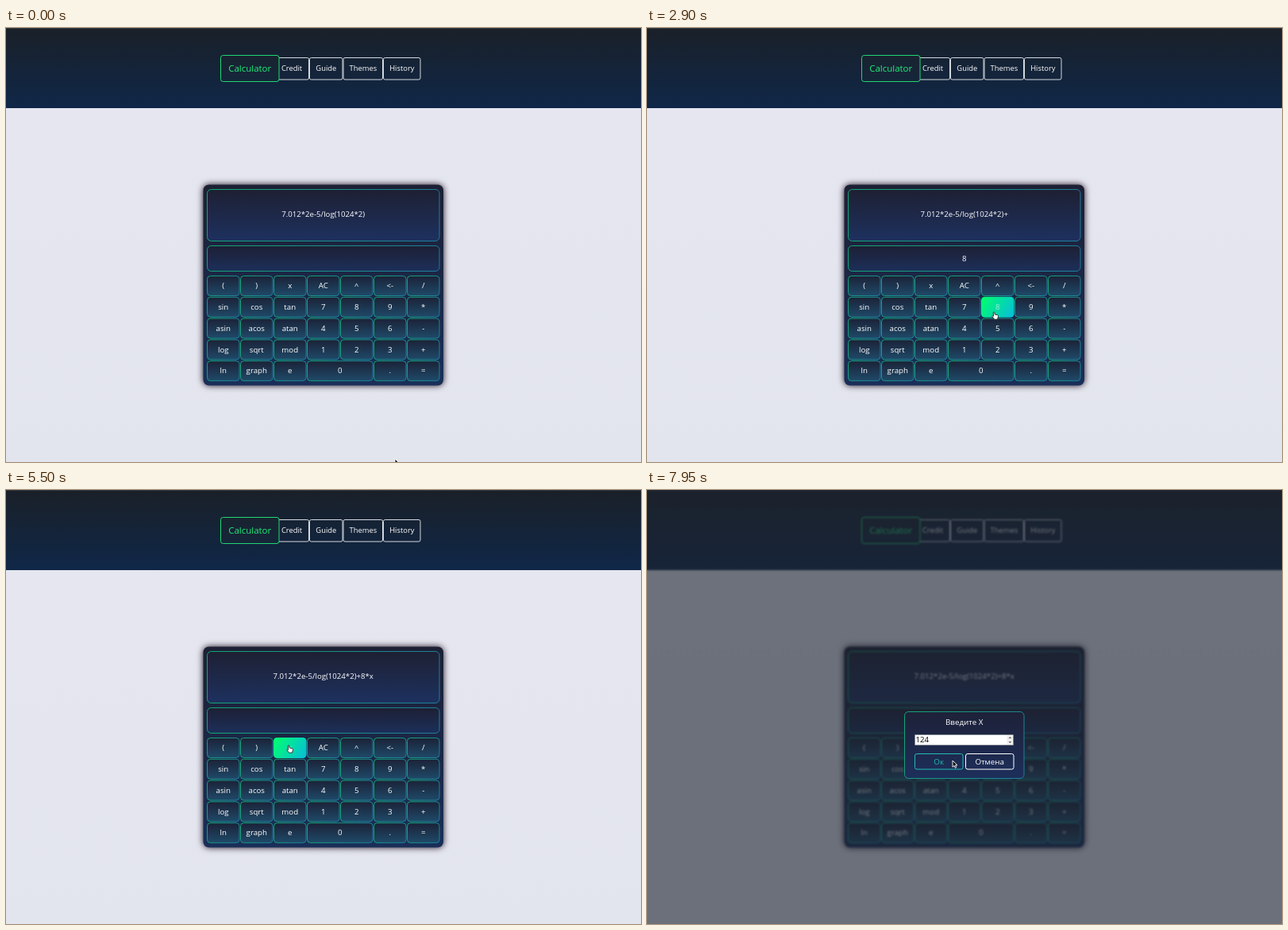
An HTML page with a canvas for the animation above (8 s loop, 800 by 547 pixels).

```html
<!DOCTYPE html>
<html lang="en">
<head>
<meta charset="utf-8">
<title>Calculator</title>
<style>
  html, body { margin: 0; width: 100%; height: 100%; overflow: hidden; background: #e4e6ef; }
  canvas { display: block; width: 800px; height: 547px; }
</style>
</head>
<body>
<canvas id="stage" width="800" height="547"></canvas>
<script>
const W = 800, H = 547, LOOP = 8000, STEP = 50;
const stage = document.getElementById('stage').getContext('2d');
const page = document.createElement('canvas');
page.width = W;
page.height = H;
const pageCtx = page.getContext('2d');

const FONT = '"Open Sans", "Noto Sans", sans-serif';
const DIALOG_AT = 6300, FADE = 200;

// Cursor stops: time, x, y
const PATH = [
  [0, 490, 543], [950, 527, 401], [1450, 527, 401], [2300, 440, 351],
  [2700, 440, 351], [2900, 437, 358], [3700, 529, 346], [4200, 529, 346],
  [4780, 354, 377], [4850, 336, 359], [5150, 356, 322], [5550, 356, 322],
  [6050, 533, 431], [6850, 533, 431], [7150, 420, 311], [7500, 420, 311],
  [7750, 385, 341], [8000, 385, 341]
];

// What the two displays show from each time on
const BASE = '7.012*2e-5/log(1024*2)';
const DISPLAY = [
  [0, BASE, ''], [1400, BASE, '+'], [2500, BASE + '+', '8'],
  [4100, BASE + '+8', '*'], [5350, BASE + '+8*x', '']
];
const INPUT = [[0, ''], [7300, '1'], [7400, '12'], [7500, '124']];

const ROWS = [
  '( ) x AC ^ <- /', 'sin cos tan 7 8 9 *', 'asin acos atan 4 5 6 -',
  'log sqrt mod 1 2 3 +', 'ln graph e 0 . ='
];
const KEYS = ROWS.flatMap((row, r) => {
  let col = 0;
  return row.split(' ').map(label => {
    const span = label === '0' ? 2 : 1;
    const key = { label, x: 253.5 + col * 42, y: 312.5 + r * 26.8, w: span * 42 - 1.5, h: 25 };
    col += span;
    return key;
  });
});

const TABS = [['Credit', 338.5, 43.5], ['Guide', 382.5, 42], ['Themes', 425, 50], ['History', 475.5, 47]];

const ease = p => p * p * (3 - 2 * p);
const latest = (list, t) => list.filter(e => e[0] <= t).pop();
const inside = (p, b) => p.x >= b.x && p.x <= b.x + b.w && p.y >= b.y && p.y <= b.y + b.h;

function cursorAt(t) {
  const time = Math.max(0, t);
  const i = Math.max(1, PATH.findIndex(s => s[0] >= time));
  const [t0, x0, y0] = PATH[i - 1], [t1, x1, y1] = PATH[i];
  const p = ease((time - t0) / (t1 - t0));
  return { x: x0 + (x1 - x0) * p, y: y0 + (y1 - y0) * p };
}

function gradient(c, x0, y0, x1, y1, from, to) {
  const g = c.createLinearGradient(x0, y0, x1, y1);
  g.addColorStop(0, from);
  g.addColorStop(1, to);
  return g;
}

function box(c, x, y, w, h, r, fill, stroke) {
  c.beginPath();
  c.roundRect(x, y, w, h, r);
  if (fill) { c.fillStyle = fill; c.fill(); }
  if (stroke) { c.strokeStyle = stroke; c.lineWidth = 1; c.stroke(); }
}

function text(c, str, x, y, size, color = '#fff', align = 'center') {
  c.font = `500 ${size}px ${FONT}`;
  c.textAlign = align;
  c.fillStyle = color;
  c.fillText(str, x, y + size * 0.36);
}

// Panel with a vertical fill and a green to blue edge
function panel(c, x, y, w, h, r, top, bottom) {
  box(c, x, y, w, h, r, gradient(c, 0, y, 0, y + h, top, bottom),
    gradient(c, x, y, x + w, y + h, '#13a774', '#217b9c'));
}

function drawHeader(c) {
  c.fillStyle = gradient(c, 0, 0, 0, 101, '#1a2028', '#0f2748');
  c.fillRect(0, 0, W, 101);
  c.fillStyle = '#3b4047';
  c.fillRect(0, 0, W, 0.8);
  for (const [label, x, w] of TABS) {
    box(c, x, 37.5, w - 0.5, 27.5, 2, null, '#d3d8dd');
    text(c, label, x + w / 2 - 0.2, 51, 9.4);
  }
  box(c, 270.5, 34.5, 73.5, 33, 3, gradient(c, 0, 34, 0, 68, '#19232f', '#15263b'), '#20d873');
  text(c, 'Calculator', 307.2, 51, 11.5, '#22ee7b');
}

function drawKey(c, key, lit) {
  const { x, y, w, h, label } = key;
  if (lit) {
    box(c, x - 0.5, y - 0.5, w + 1, h + 1, 4.5, gradient(c, x, y, x + w, y + h, '#00ff6c', '#08bddb'));
  } else {
    panel(c, x, y, w, h, 4, '#1b2237', '#1f4a69');
  }
  text(c, label, x + w / 2, y + h / 2 - 0.2, 9.7, lit ? 'rgba(255,255,255,.6)' : '#fff');
}

function drawPage(c, t) {
  c.fillStyle = gradient(c, 0, 101, 0, H, '#e5e6f0', '#e3e5ee');
  c.fillRect(0, 0, W, H);
  drawHeader(c);

  c.save();
  c.shadowColor = '#190c1d';
  c.shadowBlur = 8;
  box(c, 248.5, 197.5, 302.5, 253, 7, gradient(c, 0, 197, 0, 451, '#1d2034', '#192f59'));
  c.restore();

  const [, expr, result] = latest(DISPLAY, t);
  panel(c, 253.5, 203.5, 292.5, 65, 5, '#1e2033', '#1d315f');
  panel(c, 253.5, 274.5, 292.5, 32, 5, '#1d2034', '#1c2f5a');
  text(c, expr, 399.7, 234.2, 9.65);
  text(c, result, 399.7, 290.5, 9.7);

  const hover = t < DIALOG_AT ? cursorAt(t - 55) : { x: -1, y: -1 };
  for (const key of KEYS) drawKey(c, key, inside(hover, key));
}

function drawDialog(c, t, p) {
  panel(c, 324.5, 279.5, 150.5, 84, 5, '#1e2138', '#1d2f5b');
  text(c, 'Введите X', 399.7, 292.5, 9.8);
  box(c, 337.5, 308.5, 124, 13, 0.5, '#fff', '#858a94');
  text(c, latest(INPUT, t)[1], 338.5, 315, 9.7, '#000', 'left');

  c.fillStyle = '#ececec';
  c.fillRect(453.5, 309.5, 7.5, 11);
  c.fillStyle = '#555';
  for (const dir of [-1, 1]) {
    c.beginPath();
    c.moveTo(455.7, 315 + dir * 2);
    c.lineTo(459, 315 + dir * 2);
    c.lineTo(457.35, 315 + dir * 4);
    c.fill();
  }

  const buttons = [['Ок', 337.5], ['Отмена', 401.5]];
  for (const [label, x] of buttons) {
    const color = inside(p, { x, y: 332, w: 60.5, h: 20 }) ? '#23bcb5' : '#fff';
    box(c, x, 332.5, 60.5, 19.5, 2.5, null, color);
    text(c, label, x + 30.2, 342.2, 9.8, color);
  }
}

const SHAPES = {
  arrow: { d: new Path2D('M0 0V8.2L2 6.4L3.3 9.3L4.7 8.7L3.4 5.9H6Z'), fill: '#111', edge: '#fff' },
  hand: {
    d: new Path2D('M-.8 .3Q0-.5.8.3L1.2 3L4.6 3.7Q5.7 4 5.5 5.4L4.6 9.2H.7L-2.4 5.4Q-2.2 4.2-.4 5.4Z'),
    fill: '#fff', edge: '#222'
  },
  beam: { d: new Path2D('M-1.5 0H1.5M0 0V9M-1.5 9H1.5'), edge: '#222' }
};

function drawCursor(c, p, kind) {
  const { d, fill, edge } = SHAPES[kind];
  c.save();
  c.translate(p.x, p.y);
  c.lineWidth = 0.9;
  c.strokeStyle = edge;
  if (fill) { c.fillStyle = fill; c.fill(d); }
  c.stroke(d);
  c.restore();
}

function cursorKind(p, open) {
  if (!open) return KEYS.some(k => inside(p, k)) ? 'hand' : 'arrow';
  return inside(p, { x: 338, y: 308, w: 115, h: 14 }) ? 'beam' : 'arrow';
}

function render(t) {
  const p = cursorAt(t);
  const open = t >= DIALOG_AT;
  drawPage(pageCtx, t);
  stage.drawImage(page, 0, 0);
  if (open) {
    stage.save();
    stage.globalAlpha = Math.min(1, (t - DIALOG_AT + STEP) / FADE);
    stage.filter = 'blur(0.8px)';
    stage.drawImage(page, 0, 0);
    stage.filter = 'none';
    stage.fillStyle = 'rgba(29,36,48,.6)';
    stage.fillRect(0, 0, W, H);
    drawDialog(stage, t, p);
    stage.restore();
  }
  drawCursor(stage, p, cursorKind(p, open));
}

const start = performance.now();
function tick() {
  const t = (performance.now() - start) % LOOP;
  render(Math.floor(t / STEP) * STEP);
  requestAnimationFrame(tick);
}
tick();
</script>
</body>
</html>
```
